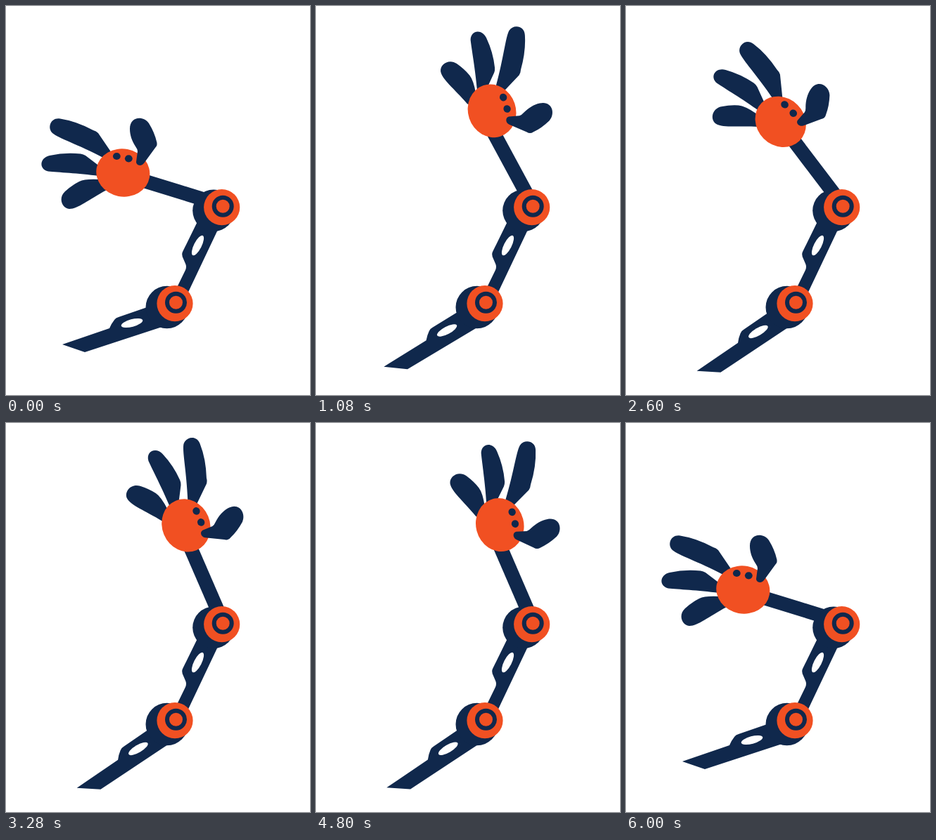
An HTML page that plays this animation: 432x554 px, repeating every 6.2 s.

```html
<!DOCTYPE html>
<html lang="en">
<head>
<meta charset="utf-8">
<title>Waving robot arm</title>
<style>
  html, body { margin: 0; width: 100%; height: 100%; overflow: hidden; background: #fff; }
  svg { display: block; width: 432px; height: 554px; }
  .navy { fill: #10284c; }
  .orange { fill: #f15022; }
  .slot { fill: #fff; }
  .ring { fill: none; stroke: #10284c; stroke-width: 6; }
  .rod { stroke: #10284c; stroke-width: 20; }
</style>
</head>
<body>
<svg viewBox="0 0 432 554">
  <defs>
    <g id="joint">
      <circle class="orange" r="25.6"/>
      <circle class="ring" cx="1.5" cy="-1.5" r="12.5"/>
    </g>
    <ellipse id="slot" class="slot" rx="15.7" ry="5.4"/>
    <ellipse id="knuckle" class="navy" rx="5.4" ry="5.1"/>
  </defs>

  <g id="base">
    <path class="navy" d="M80 482L147 459Q150 452 154 447Q156 444 160 443L215 424L240 451L112 493Z"/>
    <use href="#slot" transform="translate(179 451.5) rotate(-15)"/>
  </g>

  <path class="navy" d="M275 301L251 350Q249 354 252 360L255 367Q257 371 255 376L237 413L254 418L307 306Z"/>
  <use href="#slot" transform="translate(272.5 341) rotate(-63)"/>
  <circle class="navy" cx="295" cy="291.3" r="29.8"/>
  <circle class="navy" cx="228.7" cy="429" r="30.2"/>

  <g id="forearm">
    <path class="rod" d="M190 247.2L300 281.2"/>
    <g id="hand">
      <path id="index" class="navy" d="M150 209L131 181Q128 178 124 177Q100 164 77 160.5C64 158 58 173 66 181C74 188 102 197 138 216L150 222Z"/>
      <path id="middle" class="navy" d="M134 229L113 213Q110 211 106 210.5Q84 208 62 213C48 216 46 232 60 235.5C74 237 102 238 132 242L145 240Z"/>
      <path id="little" class="navy" d="M132 247Q112 246 104 250Q94 255 84 264C74 273 79 288 90 289C102 289 117 276 143 262L150 250Z"/>
      <ellipse class="orange" rx="38.2" ry="34" transform="translate(166.3 237.5) rotate(11)"/>
      <use href="#knuckle" x="157.3" y="214"/>
      <use href="#knuckle" x="174.3" y="217.3"/>
      <path id="thumb" class="navy" d="M185 222L187 207Q187 204 184 200C179 192 176 184 176 175C176 157 195 156 203 167Q211 180 214 193Q216 198 212 202L196 224C192 229 185 227 185 222Z"/>
    </g>
  </g>

  <use href="#joint" x="306.7" y="286.7"/>
  <use href="#joint" x="240" y="423.7"/>
</svg>
<script>
const LOOP = 6200, STEP = 40;

// Turning points of each wave: time in ms, forearm and wrist in degrees
const waves = [
  [160, 0, 0], [1020, 45.5, 17], [1470, 22, 0], [2080, 42, 6], [2340, 25, -5.5],
  [3060, 62, 9], [3560, 31, 4], [3950, 60, 10], [4360, 32, 0], [4720, 53, 17],
  [5080, 23, 0], [5390, 39, 2], [5980, 0, 0]
];
const lean = [[160, 0], [820, -15.6], [1560, -5.5], [2560, -15.5], [4720, -15.5], [5900, 0]];

const turn = (id, deg, x, y) => document.getElementById(id)
  .setAttribute('transform', `rotate(${deg.toFixed(3)} ${x} ${y})`);

// Angles at time t, eased with a cosine from one turning point to the next
function swing(points, t) {
  const next = points.findIndex(p => p[0] > t);
  if (next < 1) return points[0].slice(1);
  const from = points[next - 1], to = points[next];
  const u = (t - from[0]) / (to[0] - from[0]);
  const ease = (1 - Math.cos(Math.PI * u)) / 2;
  return from.slice(1).map((a, i) => a + (to[i + 1] - a) * ease);
}

function draw(t) {
  const [arm, wrist] = swing(waves, t);
  // Fingers follow the wrist and trail behind the forearm
  const bend = 1.35 * wrist - 0.12 * arm;
  const soften = k => bend < 0 ? bend * k : bend;
  turn('base', swing(lean, t)[0], 229, 425);
  turn('forearm', arm, 307, 285);
  turn('hand', wrist, 201.5, 250.5);
  turn('index', bend, 143, 213);
  turn('middle', bend, 133, 236);
  turn('little', soften(0.55), 138, 254);
  turn('thumb', soften(0.1), 190, 222);
}

const start = performance.now();
function tick() {
  const t = (performance.now() - start) % LOOP;
  draw(Math.floor(t / STEP) * STEP);
  requestAnimationFrame(tick);
}
tick();
</script>
</body>
</html>
```
